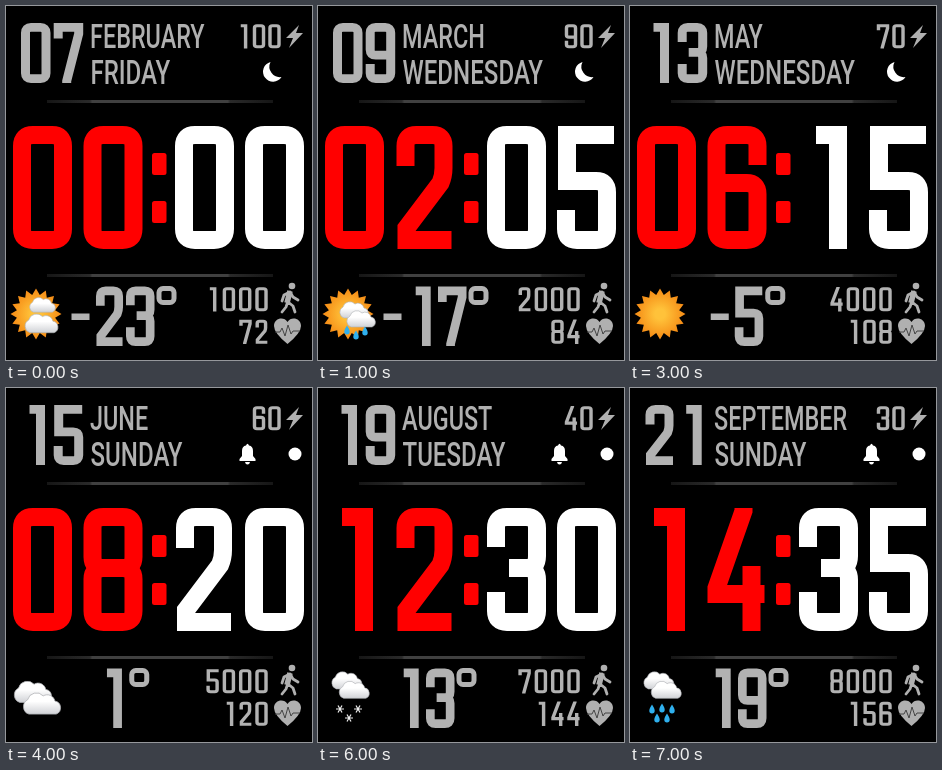
An HTML page for the animation above (8000 ms loop, 306 px wide and 354 px high).

```html
<!DOCTYPE html>
<html lang="en">
<head>
<meta charset="utf-8">
<title>Watch face</title>
<style>
  html, body { margin: 0; width: 100%; height: 100%; overflow: hidden; background: #000; }
  svg { display: block; }
  text { font: 500 33.5px Roboto, sans-serif; fill: #b0b0b0; }
</style>
</head>
<body>
<svg width="306" height="354" viewBox="0 0 306 354">
  <defs>
    <radialGradient id="sunFill">
      <stop offset=".2" stop-color="#ffc23a"/><stop offset="1" stop-color="#f58a14"/>
    </radialGradient>
    <linearGradient id="cloudFill" x2="0" y2="1">
      <stop offset=".4" stop-color="#fff"/><stop offset="1" stop-color="#d0d2d6"/>
    </linearGradient>
    <linearGradient id="lineFill">
      <stop offset="0" stop-color="#161616"/><stop offset=".19" stop-color="#2a2a2a"/>
      <stop offset=".2" stop-color="#404040"/><stop offset=".8" stop-color="#404040"/>
      <stop offset=".81" stop-color="#2a2a2a"/><stop offset="1" stop-color="#161616"/>
    </linearGradient>
    <path id="cloud" d="M6 18A6 6 0 0 1 5 7A7 7 0 0 1 17 4A6 6 0 0 1 26 8A5.2 5.2 0 0 1 27 18Z"
      fill="url(#cloudFill)" stroke="#aeb0b4" stroke-width=".6"/>
    <path id="drop" d="M0-5Q3.2 0 3 2A3 3 0 0 1-3 2Q-3.2 0 0-5Z" fill="#2fb0ee"/>
    <path id="flake" d="M-4 0H4M-2-3.5L2 3.5M2-3.5L-2 3.5" stroke="#eee" stroke-width="1.2"/>
  </defs>

  <rect x="41" y="94" width="226" height="3" fill="url(#lineFill)"/>
  <rect x="41" y="268" width="226" height="3" fill="url(#lineFill)"/>
  <g fill="red">
    <rect x="146" y="147" width="14.500" height="22" rx="2.500"/>
    <rect x="146" y="195" width="14.500" height="22" rx="2.500"/>
  </g>

  <g fill="#b0b0b0">
    <path d="M293 19L280 32H287L283 42L297 27H290Z"/>
    <circle cx="286" cy="280" r="3.3"/>
    <path d="M276 295L278 289L284 286L287 291L292 294M284 287L282 296L287 300L289 306M282 295L280 301L276 306"
      fill="none" stroke="#b0b0b0" stroke-width="2.800" stroke-linecap="round" stroke-linejoin="round"/>
    <path d="M284 285L281 297" stroke="#b0b0b0" stroke-width="5.500"/>
    <path d="M281.500 338Q268 327 268 320C268 312 278 310 281.500 316C285 310 295 312 295 320Q295 327 281.500 338Z"/>
    <path d="M269 326H274L276 322L279 330L282 319L285 328L287 325H294" fill="none" stroke="#444" stroke-width="1"/>
  </g>

  <text id="month" transform="translate(84 42) scale(.7 1)"></text>
  <text id="weekday" transform="translate(84.500 77.500) scale(.72 1)"></text>
  <g id="face"></g>
</svg>

<script>
const GRAY = '#b2b2b2';
const MONTHS = ['FEBRUARY', 'MARCH', 'APRIL', 'MAY', 'JUNE', 'JULY', 'AUGUST', 'SEPTEMBER'];
const WEEKDAYS = ['FRIDAY', 'WEDNESDAY', 'FRIDAY', 'WEDNESDAY', 'SUNDAY', 'FRIDAY', 'TUESDAY', 'SUNDAY'];

// Digit centre lines in a 59 x 123 cell
const DIGITS = [
  'M9 20V103Q9 114 20 114H39Q50 114 50 103V20Q50 9 39 9H20Q9 9 9 20Z',
  'M39 123V9H17',
  'M10 40V20Q10 9 21 9H37Q48 9 48 20V42Q48 50 45 57L11 102V114H56',
  'M9 39V20Q9 9 20 9H39Q50 9 50 20V48Q50 60 40 60H22M40 60Q50 60 50 72V103Q50 114 39 114H20Q9 114 9 103V84',
  'M36 0V3L9 80V86H57M44 58V123',
  'M57 9H10V55H39Q50 55 50 66V103Q50 114 39 114H20Q9 114 9 103V84',
  'M50 39V20Q50 9 39 9H20Q9 9 9 20V103Q9 114 20 114H39Q50 114 50 103V68Q50 57 39 57H9',
  'M9 32V9H50V22L26 119V123',
  'M20 60Q9 60 9 49V20Q9 9 20 9H39Q50 9 50 20V49Q50 60 39 60ZM20 60Q9 60 9 71V103Q9 114 20 114H39Q50 114 50 103V71Q50 60 39 60',
  'M9 84V103Q9 114 20 114H39Q50 114 50 103V20Q50 9 39 9H20Q9 9 9 20V55Q9 66 20 66H50',
];

const pad = n => String(n).padStart(2, '0');
const use = (id, x, y, scale = 1) => `<use href="#${id}" transform="translate(${x} ${y}) scale(${scale})"/>`;

function number(value, x, y, width, height, pitch, color = GRAY, weight = 18) {
  const glyphs = [...String(value)].map((d, i) =>
    `<path transform="translate(${x + i * pitch} ${y}) scale(${width / 59} ${height / 123})" d="${DIGITS[d]}"/>`);
  return `<g fill="none" stroke="${color}" stroke-width="${weight}">${glyphs.join('')}</g>`;
}

const smallNumber = (value, right, y, pitch) =>
  number(value, right - 13 - (String(value).length - 1) * pitch, y, 13, 24.5, pitch, GRAY, 15.5);

function temperature(value) {
  const digits = String(Math.abs(value));
  const sign = value < 0 ? 24 : 0;
  const left = 118.5 - (sign + digits.length * 30.5 + 21) / 2;
  const end = left + sign + digits.length * 30.5;
  return (sign ? `<rect x="${left}" y="307.5" width="18" height="6.5" fill="${GRAY}"/>` : '') +
    number(digits, left + sign, 280.5, 28.5, 59.5, 30.5) +
    `<rect x="${end + 2.5}" y="282.5" width="15" height="14" rx="4" fill="none" stroke="${GRAY}" stroke-width="5"/>`;
}

function sun() {
  const points = Array.from({ length: 32 }, (_, i) => {
    const r = i % 2 ? 19.5 : 25.5, a = i * Math.PI / 16;
    return [30 + r * Math.sin(a), 308 - r * Math.cos(a)].map(v => v.toFixed(1));
  });
  return `<polygon points="${points.join(' ')}" fill="url(#sunFill)"/>`;
}

const clouds = (x, y, scale = 1) => use('cloud', x, y, scale) + use('cloud', x + 7 * scale, y + 9 * scale, scale);
const scatter = (id, spots, scale) => spots.map(([x, y]) => use(id, x, y, scale)).join('');
const WEATHER = [
  () => sun() + use('cloud', 22, 290, .9) + use('cloud', 17, 306, 1.15),
  () => sun() + clouds(20, 294) + scatter('drop', [[29, 324], [38, 329], [47, 325]], .9),
  () => sun() + clouds(20, 292) + scatter('flake', [[35, 328], [46, 328], [40, 333]], .8),
  sun,
  () => clouds(6, 291, 1.3),
  () => clouds(12, 282, 1.05) + scatter('drop', [[22, 321], [40, 321], [31, 330]], .9),
  () => clouds(12, 282, 1.05) + scatter('flake', [[22, 321], [40, 321], [31, 330]]),
  () => clouds(12, 282, 1.05) + scatter('drop', [[22, 321], [32, 320], [42, 321], [27, 330], [37, 330]], .9),
];

const MOON = '<path d="M264.5 56A10 10 0 1 0 275.5 71A10.5 10.5 0 0 1 264.500 56Z" fill="#fff"/>';
const ALERTS = `<g fill="#fff"><path d="M233.5 73V71L236 68V63Q236 58 240 57.5Q241.500 54 243 57.5Q247 58 247 63V68L249.500 71V73Z"/>
  <path d="M239 74H244Q243.500 76.500 241.500 76.500T239 74Z"/><circle cx="289" cy="66" r="6.5"/></g>`;

const byId = id => document.getElementById(id);

function draw(step) {
  byId('month').textContent = MONTHS[step];
  byId('weekday').textContent = WEEKDAYS[step];
  byId('face').innerHTML =
    number(pad(7 + 2 * step), 15, 17, 29.5, 60, 32.7) +
    smallNumber(100 - 10 * step, 275, 18, 15.5) +
    (step < 4 ? MOON : ALERTS) +
    number(pad(2 * step), 7, 120, 59, 123, 70.5, 'red') +
    number(pad(5 * step), 169, 120, 59, 123, 70, '#fff') +
    WEATHER[step]() +
    temperature(6 * step - 23) +
    smallNumber(1000 * (step + 1), 262, 281, 16.3) +
    smallNumber(72 + 12 * step, 262, 313.5, 16);
}

let shown = -1;
function tick() {
  const step = Math.floor(performance.now() / 1000) % 8;
  if (step !== shown) draw(shown = step);
  requestAnimationFrame(tick);
}
tick();
</script>
</body>
</html>
```
